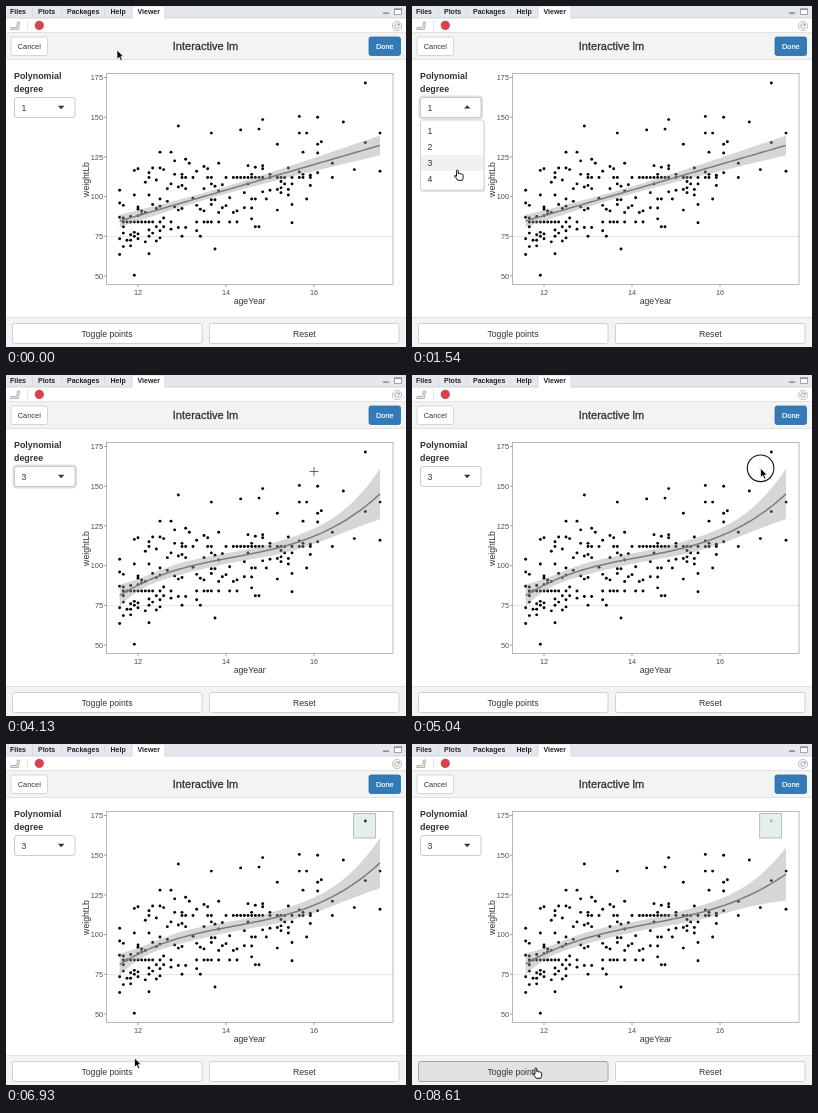
Write an HTML page that moves like this. It is 400 px wide and 341 px high and loops after 9010 ms.

```html
<!DOCTYPE html>
<html lang="en">
<head>
<meta charset="utf-8">
<title>Interactive model fit</title>
<style>
  html, body { margin: 0; width: 100%; height: 100%; overflow: hidden; background: #fff; }
  svg { display: block; width: 100vw; height: 100vh; }
  text { font: 8.7px "Liberation Sans", Arial, sans-serif; fill: #333; }
  .tab { font-size: 7px; font-weight: bold; fill: #222; }
  .small { font-size: 7.4px; }
  .tick { font-size: 7.3px; fill: #4d4d4d; }
  .bold { font-size: 8.9px; font-weight: bold; }
  .mid { text-anchor: middle; }
  .end { text-anchor: end; }
</style>
</head>
<body>
<svg id="stage" viewBox="0 0 400 341">
  <rect width="400" height="341" fill="#fff"/>

  <!-- pane tabs and toolbar -->
  <rect width="400" height="12" fill="#e4e7eb"/>
  <path d="M0 12H126M159 12H400" stroke="#c9cdd2" stroke-width=".8"/>
  <path d="M126 12V1.5Q126 0 127.5 0H157.5Q159 0 159 1.5V12" fill="#fff" stroke="#c9cdd2" stroke-width=".7"/>
  <path d="M26.5 1V11M55.5 1V11M98.5 1V11" stroke="#d3d7dc" stroke-width=".7"/>
  <g id="tabs"></g>
  <path d="M377 7.2h6" stroke="#8a929a" stroke-width="1.6"/>
  <rect x="388.5" y="2.8" width="7" height="5.6" fill="#fff" stroke="#8a929a" stroke-width=".8"/>
  <path d="M388 3.4h8" stroke="#8a929a" stroke-width="1.3"/>
  <path d="M5 21.5h5.5l1-5.5h2l-1 7.5H4.5z" fill="#e6e6e6" stroke="#a5a5a5" stroke-width=".8"/>
  <path d="M21.5 15V24" stroke="#ddd" stroke-width=".8"/>
  <circle cx="33.3" cy="19.4" r="4.3" fill="#d9414b" stroke="#b9323c" stroke-width=".5"/>
  <circle cx="391" cy="20" r="4.6" fill="#f6f6f6" stroke="#b5b5b5" stroke-width=".8"/>
  <path d="M393 19a2.2 2.2 0 1 0 .1 1.8M393.4 17.5v1.8h-1.8" fill="none" stroke="#999" stroke-width=".8"/>

  <!-- title bar -->
  <rect y="26.5" width="400" height="27" fill="#f2f3f3"/>
  <path d="M0 26.5H400M0 53.5H400" stroke="#dcdcdc" stroke-width=".8"/>
  <rect x="5" y="31" width="36.5" height="18.5" rx="2" fill="#fff" stroke="#ccc" stroke-width=".8"/>
  <text class="small mid" x="23.3" y="43">Cancel</text>
  <text class="mid" x="199.5" y="44" style="font-size:11px" stroke="#333" stroke-width=".3">Interactive lm</text>
  <rect x="363" y="31" width="31.5" height="18.5" rx="2" fill="#337ab7" stroke="#2e6da4" stroke-width=".8"/>
  <text class="small mid" x="378.8" y="43" style="fill:#fff" stroke="#fff" stroke-width=".2">Done</text>

  <!-- plot -->
  <path d="M100 230.7H387" stroke="#e3e3e3" stroke-width=".9"/>
  <g id="dots"></g>
  <path id="band" fill="#999" fill-opacity=".4"/>
  <path id="fit" fill="none" stroke="#7c7c7c" stroke-width="1.5"/>
  <rect x="100.5" y="67.5" width="286.5" height="211" fill="none" stroke="#a8a8a8" stroke-width=".8"/>
  <g id="axes"></g>
  <text class="mid" x="243.7" y="297.5">ageYear</text>
  <text class="mid" transform="translate(82.5 173.5) rotate(-90)">weightLb</text>
  <rect id="brush" fill="#96b9b9" fill-opacity=".25" stroke="#b0b6b6" stroke-width=".8"/>

  <!-- degree picker -->
  <text class="bold" x="8" y="73">Polynomial</text>
  <text class="bold" x="8" y="85.5">degree</text>
  <rect id="glow" x="7.6" y="90.6" width="62.4" height="21.8" rx="3" fill="none" stroke="#000" stroke-opacity=".12" stroke-width="2.4"/>
  <rect x="8.5" y="91.5" width="60.5" height="20" rx="2.5" fill="#fff" stroke="#c6c6c6" stroke-width=".9"/>
  <text id="degree" x="15.5" y="104.8"></text>
  <path id="caret" fill="#333"/>
  <g id="menu">
    <rect x="8" y="115.5" width="65" height="70.5" rx="2" fill="#000" opacity=".1"/>
    <rect x="8.5" y="114" width="63.5" height="70" rx="2" fill="#fff" stroke="#ccc" stroke-width=".8"/>
    <rect id="hover" x="9" width="62.5" height="16" fill="#f0f0f0"/>
  </g>

  <!-- footer -->
  <rect y="311.5" width="400" height="30" fill="#f2f3f3"/>
  <path d="M0 311.5H400" stroke="#dcdcdc" stroke-width=".8"/>
  <rect id="toggle" x="6.5" y="317.5" width="189.5" height="20" rx="2" stroke-width=".9"/>
  <text class="mid" x="101" y="330.7">Toggle points</text>
  <rect x="203.5" y="317.5" width="189.5" height="20" rx="2" fill="#fff" stroke="#ccc" stroke-width=".9"/>
  <text class="mid" x="298.3" y="330.7">Reset</text>

  <g id="pointer">
    <circle id="press" r="13.3" fill="none" stroke="#111" stroke-width="1.1"/>
    <path id="arrow" d="M0 0V9.2L2.2 7.2 3.7 10.6 5.3 9.9 3.8 6.6H6.6Z" fill="#000" stroke="#fff" stroke-width=".7"/>
    <path id="cross" d="M-4.5 0H4.5M0-4.5V4.5" stroke="#555" stroke-width=".9"/>
    <path id="hand" transform="translate(-4 -.7)" d="M3 7V1.3q.9-1.3 1.8 0V4.4q1-.7 1.7.2 1-.6 1.7.4 1.2-.4 1.5.8V8Q9.4 9.5 8.8 11H4.2Q3.2 9 .8 6.7 .9 5.4 3 7z" fill="#fff" stroke="#000" stroke-width=".9"/>
  </g>
</svg>
<script>
const LOOP = 9010, STEP = 70;
const $ = id => document.getElementById(id);

function add(parent, tag, attrs, label) {
  const el = document.createElementNS("http://www.w3.org/2000/svg", tag);
  for (const k in attrs) el.setAttribute(k, attrs[k]);
  if (label !== undefined) el.textContent = label;
  return $(parent).appendChild(el);
}
function set(id, attrs) {
  for (const k in attrs) $(id).setAttribute(k, attrs[k]);
}
const show = (id, on) => set(id, { visibility: on ? "visible" : "hidden" });

// Plot scales: age in months, weight in pounds
const px = month => 132 + (month / 12 - 12) * 44;
const py = weight => 71.5 + (175 - weight) * 1.588;

// Weights for each month of age, starting at 139
const weights = [
  [63.5, 73.5, 87, 96, 104], [68.5, 77, 81, 86.5, 94.5], [72.5], [69, 72.5, 76, 87.5],
  [50.5, 75, 77.5, 101, 116.5], [73.5, 76.5, 88, 92, 93.5, 117.5], [89, 91], [71.5, 90, 109],
  [64, 75, 79, 101, 115], [77, 95, 118], [72, 81, 92.5, 110.5], [74, 78.5, 94, 98.5, 118, 128],
  [81, 86.5, 117], [97, 105], [79.5, 108, 128], [93.5, 114, 122.5], [80.5, 91.5, 106, 144.5],
  [75, 92.5, 107, 114], [80.5, 105, 123.5], [121], [99], [78.5, 94.5, 116], [75, 92],
  [91, 105, 119], [117.5], [95, 98, 108, 140], [67, 98, 106.5], [90, 103.5, 121], [93, 107.5],
  [94.3], [99.3], [90], [91], [142], [93, 102.5], [108, 119.5], [86, 92.8, 98.5, 114],
  [81, 98.5, 118.5], [81, 142.5], [103, 117.5, 119.5, 148.5], [98.5], [104, 114], [],
  [91.5, 104.5, 133], [102.5, 105.5, 109.5], [108], [101, 104.5, 118], [83.5, 95, 108], [],
  [115.5, 140, 150.5], [114, 128], [98.5, 140], [107, 113.5]
];
const older = {
  193: [115, 127.5, 133, 150], 194: [134.5], 197: [112, 121], 200: [147],
  203: [117], 206: [134], 210: [116, 140]
};
const outlier = [206, 171.5];

const range = (a, b) => Array.from({ length: b - a + 1 }, (_, i) => a + i);
const points = [];
weights.forEach((ws, i) => ws.forEach(w => points.push([139 + i, w])));
for (const m in older) older[m].forEach(w => points.push([+m, w]));
// Two weights recur at many ages
[...range(140, 148), 150, 153, 160, 162, 163, 164, 166, 169, 171]
  .forEach(m => points.push([m, 84]));
[147, 156, 157, 159, 163, 164, 168, ...range(170, 178), 180, 182, 183, 184, 186, 188, 189, 191]
  .forEach(m => points.push([m, 112]));

const dot = ([m, w]) => add("dots", "circle", { cx: px(m), cy: py(w), r: 1.45 });
points.forEach(dot);
const outlierDot = dot(outlier);

// Gauss-Jordan inverse
function invert(matrix) {
  const n = matrix.length;
  const a = matrix.map((row, i) => [...row, ...row.map((_, j) => +(i === j))]);
  for (let c = 0; c < n; c++) {
    const p = a[c][c];
    a[c] = a[c].map(v => v / p);
    for (let r = 0; r < n; r++) {
      if (r === c) continue;
      const f = a[r][c];
      a[r] = a[r].map((v, j) => v - f * a[c][j]);
    }
  }
  return a.map(row => row.slice(n));
}

// Least-squares polynomial with its 95% confidence band, as path data
function model(data, degree) {
  const terms = range(0, degree);
  const basis = m => terms.map(k => ((m - 170) / 36) ** k);
  const dotp = (u, v) => u.reduce((s, x, i) => s + x * v[i], 0);
  const rows = data.map(([m]) => basis(m));
  const inv = invert(terms.map(i => terms.map(j => rows.reduce((s, r) => s + r[i] * r[j], 0))));
  const xty = terms.map(i => rows.reduce((s, r, k) => s + r[i] * data[k][1], 0));
  const beta = inv.map(r => dotp(r, xty));
  const rss = data.reduce((s, d, k) => s + (d[1] - dotp(rows[k], beta)) ** 2, 0);
  const variance = rss / (data.length - degree - 1);
  const line = [], top = [], low = [];
  for (let i = 0; i < 80; i++) {
    const m = 139 + 71 * i / 79, b = basis(m), w = dotp(b, beta);
    const half = 1.97 * Math.sqrt(variance * dotp(b, inv.map(r => dotp(r, b))));
    const at = v => px(m).toFixed(2) + " " + py(v).toFixed(2);
    line.push(at(w));
    top.push(at(w + half));
    low.unshift(at(w - half));
  }
  return { fit: "M" + line.join("L"), band: "M" + top.concat(low).join("L") + "Z" };
}
const everyone = [...points, outlier];
const linear = model(everyone, 1), cubic = model(everyone, 3), trimmed = model(points, 3);

[["Files", 4], ["Plots", 32], ["Packages", 61], ["Help", 104.5], ["Viewer", 131.5]]
  .forEach(([s, x]) => add("tabs", "text", { x, y: 7.6, class: "tab" }, s));
for (let w = 50; w <= 175; w += 25) {
  add("axes", "path", { d: `M98 ${py(w)}h2.5`, stroke: "#888", "stroke-width": .8 });
  add("axes", "text", { x: 97, y: py(w) + 2.7, class: "tick end" }, w);
}
for (let year = 12; year <= 16; year += 2) {
  const x = px(year * 12);
  add("axes", "path", { d: `M${x} 278.5v2.5`, stroke: "#888", "stroke-width": .8 });
  add("axes", "text", { x, y: 289, class: "tick mid" }, year);
}
for (let i = 1; i <= 4; i++) add("menu", "text", { x: 15.5, y: 112.2 + 16 * i }, i);

// Pointer path: time, x, y
const path = [
  [70, 111, 44], [630, 52, 102], [1050, 52, 102], [1540, 45.5, 164], [2590, 45.5, 164],
  [3150, 60, 154], [3850, 304, 100], [4060, 304, 100], [4130, 308, 96.5], [4700, 348, 94],
  [4970, 348, 94], [5670, 369, 70.5], [5810, 369.5, 69.5], [6020, 369.5, 69.5],
  [6860, 129, 313], [6930, 128.5, 314], [7210, 124, 324]
];
function pointerAt(t) {
  const i = path.findIndex(k => k[0] > t);
  if (i === 0) return path[0].slice(1);
  if (i < 0) return path[path.length - 1].slice(1);
  const [t0, x0, y0] = path[i - 1], [t1, x1, y1] = path[i];
  const u = (t - t0) / (t1 - t0), e = u * u * (3 - 2 * u);
  return [x0 + (x1 - x0) * e, y0 + (y1 - y0) * e];
}

const within = (t, a, b) => t >= a && t < b;

function render(time) {
  const t = Math.floor(time / STEP) * STEP;
  const [x, y] = pointerAt(t);
  const open = within(t, 770, 2450);
  const excluded = t >= 7910;

  const curve = excluded ? trimmed : t >= 2660 ? cubic : linear;
  set("fit", { d: curve.fit });
  set("band", { d: curve.band });
  outlierDot.setAttribute("opacity", excluded ? .3 : 1);

  $("degree").textContent = t < 2450 ? 1 : 3;
  set("caret", { d: open ? "M52 102.6h6.4l-3.2-3.4z" : "M52 99.8h6.4l-3.2 3.4z" });
  show("glow", within(t, 700, 4900));
  show("menu", open);
  const item = Math.max(0, Math.min(3, Math.floor((y - 117) / 16)));
  set("hover", { y: 117 + item * 16 });

  const drag = pointerAt(Math.min(t, 5810));
  show("brush", t > 4970);
  if (t > 4970) {
    set("brush", {
      x: 347.7, y: drag[1], width: Math.max(0, drag[0] - 347.7), height: 94 - drag[1],
      stroke: t < 5880 ? "#c4c9c9" : "#a9b0b0"
    });
  }

  const over = t > 6930 && y > 317;
  set("toggle", {
    fill: t >= 7420 ? "#e2e2e2" : over ? "#e6e6e6" : "#fff",
    stroke: t >= 7420 ? "#9a9a9a" : over ? "#adadad" : "#ccc"
  });

  const hand = over || t < 2660 && x < 70 && y > 91;
  const brushing = within(t, 4971, 6021);
  const cross = !hand && !brushing && x > 76 && y > 55 && y < 311 && t > 3150;
  set("pointer", { transform: `translate(${x.toFixed(2)} ${y.toFixed(2)})` });
  show("hand", hand);
  show("cross", cross);
  show("arrow", !hand && !cross);
  show("press", within(t, 700, 840) || within(t, 2240, 2450) ||
    within(t, 4900, 5880) || within(t, 7420, 7700));
}

const start = performance.now();
function tick() {
  render((performance.now() - start) % LOOP);
  requestAnimationFrame(tick);
}
render(0);
requestAnimationFrame(tick);
</script>
</body>
</html>
```
